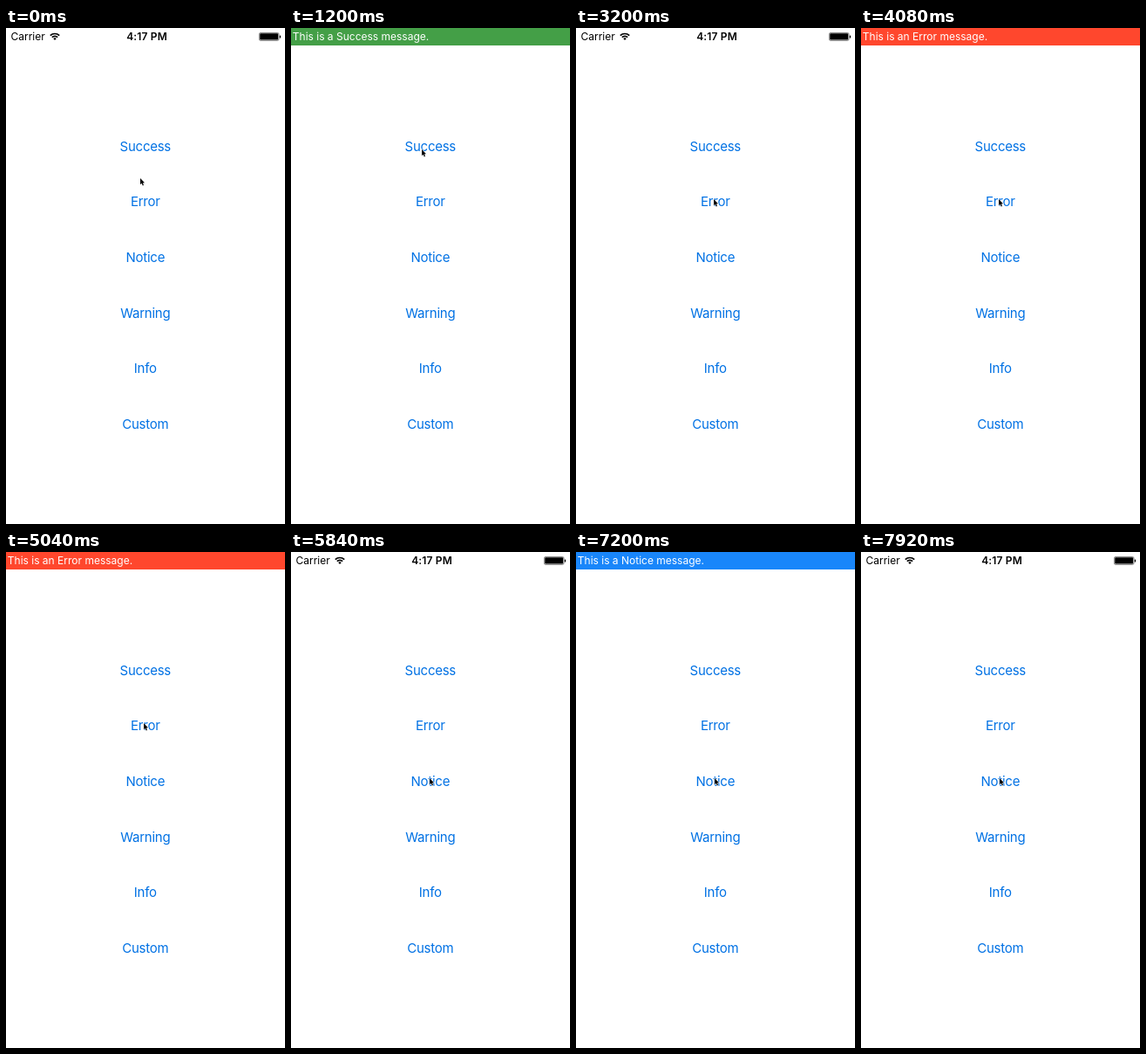
An HTML page with a canvas that plays this animation: 320x568 px, repeating every 8000 ms.

```html
<!DOCTYPE html>
<html lang="en">
<head>
<meta charset="utf-8">
<title>Status messages</title>
<style>
  html, body { margin: 0; width: 100%; height: 100%; overflow: hidden; background: #fff; }
  canvas { display: block; width: 320px; height: 568px; }
</style>
</head>
<body>
<canvas id="stage"></canvas>
<script>
const W = 320, H = 568, LOOP = 8000, SLIDE = 280, BAR = 20;
const FONT = 'Inter, Roboto, "Liberation Sans", sans-serif';
const canvas = document.getElementById('stage');
const ctx = canvas.getContext('2d');
const dpr = window.devicePixelRatio || 1;
canvas.width = W * dpr;
canvas.height = H * dpr;

const labels = ['Success', 'Error', 'Notice', 'Warning', 'Info', 'Custom'];
const banners = [
  { start: 720, end: 2660, color: '#449f47', text: 'This is a Success message.' },
  { start: 3440, end: 5380, color: '#ff472d', text: 'This is an Error message.' },
  { start: 5960, end: 7900, color: '#1986fa', text: 'This is a Notice message.' }
];
// Pointer stops: time, x, y
const stops = [
  [0, 154, 172], [80, 154, 172], [560, 150, 139],
  [2660, 150, 139], [3120, 158, 196],
  [5300, 158, 196], [5740, 159, 259]
];

const clamp = v => Math.min(1, Math.max(0, v));
const ease = v => v * v * (3 - 2 * v);

function text(str, x, y, size, color, align = 'left', weight = 400, spacing = 0) {
  ctx.font = `${weight} ${size}px ${FONT}`;
  ctx.letterSpacing = spacing + 'px';
  ctx.textAlign = align;
  ctx.fillStyle = color;
  ctx.fillText(str, x, y);
}

function wifi(x, y) {
  ctx.strokeStyle = ctx.fillStyle = '#000';
  ctx.lineWidth = 1.7;
  for (const r of [4.5, 7.4]) {
    ctx.beginPath();
    ctx.arc(x, y, r, -Math.PI * 0.75, -Math.PI * 0.25);
    ctx.stroke();
  }
  ctx.beginPath();
  ctx.moveTo(x, y);
  ctx.arc(x, y, 2.6, -Math.PI * 0.75, -Math.PI * 0.25);
  ctx.fill();
}

function battery() {
  ctx.strokeStyle = '#555';
  ctx.lineWidth = 0.7;
  ctx.beginPath();
  ctx.roundRect(290.4, 5.5, 22.6, 8.9, 1.6);
  ctx.stroke();
  ctx.fillStyle = '#000';
  ctx.beginPath();
  ctx.roundRect(291.2, 6.3, 21, 7.3, 0.8);
  ctx.fill();
  ctx.beginPath();
  ctx.roundRect(313.8, 8.4, 1.3, 3.2, 0.6);
  ctx.fill();
}

function statusBar() {
  text('Carrier', 5.5, 14.3, 12, '#000');
  wifi(56, 13.9);
  text('4:17 PM', 161.5, 14.3, 12, '#000', 'center', 600, 0.15);
  battery();
}

function banner(b, t) {
  if (t < b.start || t > b.end) return;
  const shown = ease(clamp((t - b.start) / SLIDE)) * ease(clamp((b.end - t) / SLIDE));
  const y = (shown - 1) * BAR;
  ctx.fillStyle = b.color;
  ctx.fillRect(0, y, W, BAR);
  text(b.text, 1.8, y + 14.3, 12, '#fff');
}

function pointerAt(t) {
  const i = stops.findIndex(s => s[0] > t);
  if (i < 0) return stops[stops.length - 1].slice(1);
  const [t0, x0, y0] = stops[i - 1], [t1, x1, y1] = stops[i];
  const k = ease((t - t0) / (t1 - t0));
  return [x0 + (x1 - x0) * k, y0 + (y1 - y0) * k];
}

function pointer(x, y) {
  ctx.save();
  ctx.translate(x, y);
  ctx.beginPath();
  ctx.moveTo(0, 0);
  ctx.lineTo(0, 7.2);
  ctx.lineTo(1.6, 5.8);
  ctx.lineTo(2.8, 8.6);
  ctx.lineTo(4, 8.1);
  ctx.lineTo(2.9, 5.4);
  ctx.lineTo(5, 5.2);
  ctx.closePath();
  ctx.strokeStyle = 'rgba(255,255,255,.8)';
  ctx.lineWidth = 1.2;
  ctx.stroke();
  ctx.fillStyle = '#000';
  ctx.fill();
  ctx.restore();
}

function draw(now) {
  const t = now % LOOP;
  ctx.setTransform(dpr, 0, 0, dpr, 0, 0);
  ctx.fillStyle = '#fff';
  ctx.fillRect(0, 0, W, H);
  labels.forEach((s, i) => text(s, 159.8, 140.5 + i * 63.7, 15, '#0071e4', 'center', 400, -0.25));
  statusBar();
  banners.forEach(b => banner(b, t));
  pointer(...pointerAt(t));
}

const begin = performance.now();
function tick() {
  draw(performance.now() - begin);
  requestAnimationFrame(tick);
}
tick();
</script>
</body>
</html>
```
